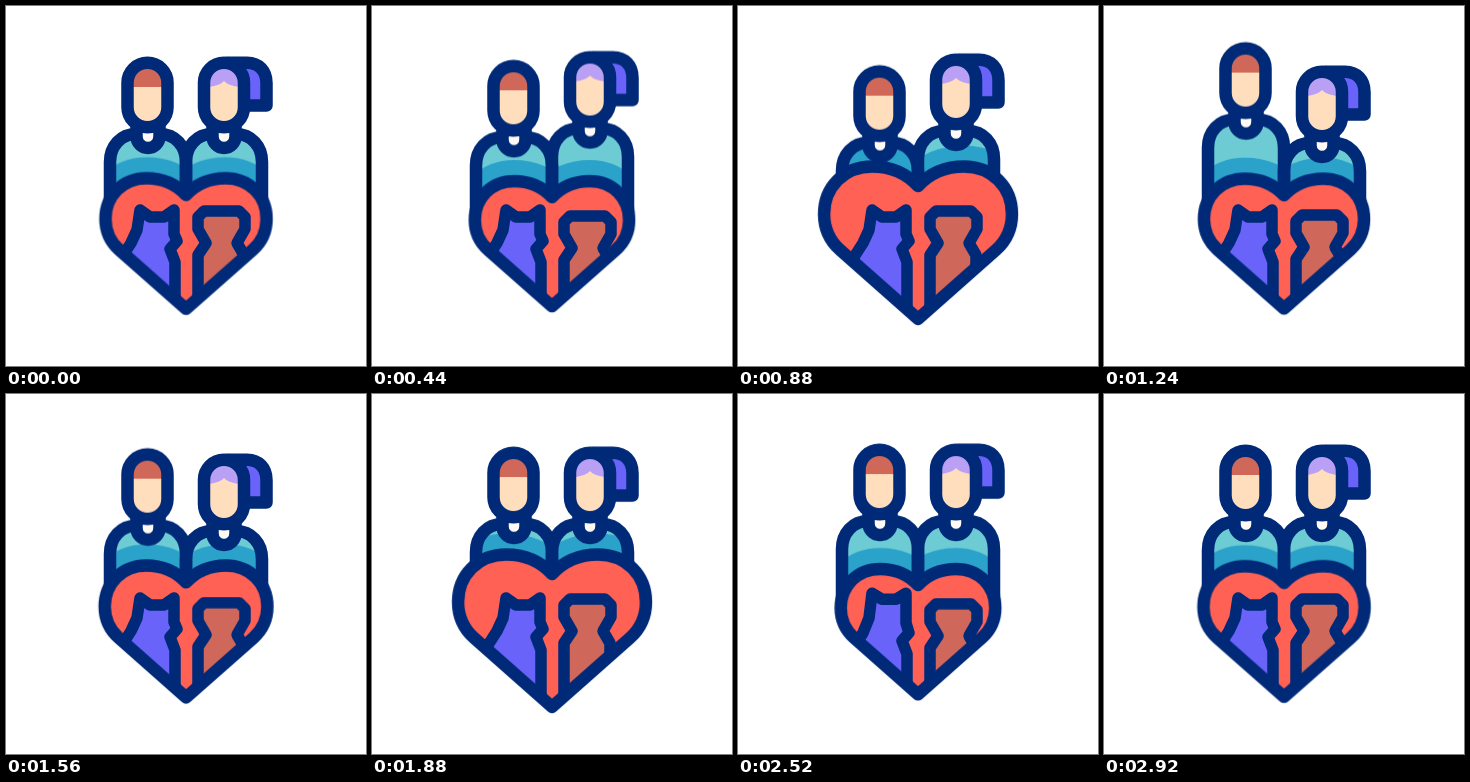
Recreate the animation shown at these times as an HTML page. Size 360 px wide and 360 px high, loop 3 s.

```html
<!DOCTYPE html>
<html lang="en">
<head>
<meta charset="utf-8">
<title>Family heart</title>
<style>
  html, body { margin: 0; width: 100%; height: 100%; overflow: hidden; background: #fff; }
  svg { display: block; width: 100vw; height: 100vh; }
  .line { stroke: #002a78; stroke-width: 12.5; stroke-linejoin: round; stroke-linecap: round; }
  .thin { stroke-width: 11.5; }
  .hollow { fill: none; }
  .man, .woman, .heart, .cat, .dog {
    animation: 3s cubic-bezier(.37, 0, .63, 1) infinite;
  }
  .man { animation-name: man; }
  .woman { animation-name: woman; }
  .dog { animation-name: duck; }
  .cat { animation-name: stretch; }
  .heart { animation-name: beat; transform-origin: 180px 242px; }
  .shade { fill: #2ba2ca; stroke: #2ba2ca; stroke-width: 42; }

  @keyframes man {
    0%, 6.667% { transform: translateY(0); }
    27.333% { transform: translateY(10px); }
    40.667% { transform: translateY(-14.5px); }
    57.333% { transform: translateY(9px); }
    70.667% { transform: translateY(-11px); }
    83% { transform: translateY(-1px); }
    95%, 100% { transform: translateY(0); }
  }
  @keyframes woman {
    0% { transform: translateY(0); }
    7.333% { transform: translateY(5px); }
    21.667% { transform: translateY(-15px); }
    37.333% { transform: translateY(9.5px); }
    41.333%, 57.333% { transform: translateY(9px); }
    70.667% { transform: translateY(-11px); }
    83% { transform: translateY(-1px); }
    95%, 100% { transform: translateY(0); }
  }
  @keyframes beat {
    0% { transform: scale(.857); }
    13.333% { transform: scale(.817); }
    28.667% { transform: scale(1); }
    46.667% { transform: scale(.815); }
    62% { transform: scale(1); }
    80% { transform: scale(.817); }
    97.333%, 100% { transform: scale(.857); }
  }
  @keyframes duck {
    0%, 28.667%, 62%, 97.333%, 100% { transform: translateY(0); }
    14%, 46.667%, 82% { transform: translateY(5px); }
  }
  @keyframes stretch {
    0%, 62%, 97.333%, 100% {
      d: path("M100 276L125 237L131 224L134 204L144 211H158L168 204V228L171 235L164 243L169 256V320H100Z");
    }
    82% {
      d: path("M100 276L125 239L131 224L134 199L144 205H158L168 199V229L171 239L164 247L169 260V320H100Z");
    }
  }
</style>
</head>
<body>
<svg viewBox="0 0 360 360">
  <defs>
    <path id="heartShape" vector-effect="non-scaling-stroke" d="M180 180C168 167 152 160.500 134 160.500C106 160.500 86 181 86 208C86 222 92 235 102 244L180 313L258 244C268 235 274 222 274 208C274 181 254 160.500 226 160.500C208 160.500 192 167 180 180Z"/>
    <path id="torso" d="M-38 212V156C-38 140 -27 128 -12 128H12C27 128 38 140 38 156V212"/>
    <path id="collar" d="M-11.500 120V130.500A11.500 11.500 0 0 0 11.500 130.500V120"/>
    <rect id="face" x="-20" y="56.700" width="40" height="64.600" rx="20"/>
    <clipPath id="faceClip"><use href="#face"/></clipPath>
    <clipPath id="manClip">
      <path class="man" d="M104 212V156C104 140 115 128 130 128H154C169 128 180 140 180 156V212Z"/>
    </clipPath>
    <clipPath id="womanClip">
      <path class="woman" d="M180 212V156C180 140 191 128 206 128H230C245 128 256 140 256 156V212Z"/>
    </clipPath>
    <clipPath id="heartClip"><use href="#heartShape" class="heart"/></clipPath>
  </defs>

  <!-- Torsos with the shade cast by the heart -->
  <g class="man"><use href="#torso" x="142" fill="#6dccd3"/></g>
  <g clip-path="url(#manClip)"><use href="#heartShape" class="heart shade"/></g>
  <g class="woman"><use href="#torso" x="218" fill="#6dccd3"/></g>
  <g clip-path="url(#womanClip)"><use href="#heartShape" class="heart shade"/></g>

  <g class="man">
    <use href="#torso" x="142" class="line hollow"/>
    <use href="#collar" x="142" class="line" fill="#fffaf6"/>
  </g>
  <g class="woman">
    <use href="#torso" x="218" class="line hollow"/>
    <use href="#collar" x="218" class="line" fill="#fffaf6"/>
  </g>

  <!-- Heads -->
  <g class="man">
    <g transform="translate(141.500 0)">
      <g clip-path="url(#faceClip)">
        <rect x="-20" y="56" width="40" height="66" fill="#ffdebe"/>
        <rect x="-20" y="56" width="40" height="25" fill="#d0685a"/>
      </g>
      <use href="#face" class="line hollow"/>
    </g>
  </g>
  <g class="woman">
    <path class="line" fill="#6a63fa" d="M222 56.700H241C253 56.700 260.500 65 260.500 77V99.500H238Z"/>
    <g transform="translate(218 0)">
      <g clip-path="url(#faceClip)">
        <rect x="-20" y="56" width="40" height="66" fill="#ffdebe"/>
        <path fill="#baa0f4" d="M-20 56H20V81C11 81 4 79 0 75C-4 79 -11 81 -20 81Z"/>
      </g>
      <use href="#face" class="line hollow"/>
    </g>
  </g>

  <!-- Heart and pets -->
  <use href="#heartShape" class="heart" fill="#ff6255"/>
  <g clip-path="url(#heartClip)">
    <path class="cat line thin" fill="#6a63fa" d="M100 276L125 237L131 224L134 204L144 211H158L168 204V228L171 235L164 243L169 256V320H100Z"/>
    <path class="dog line thin" fill="#cf685a" d="M192 320V249L200 237L192 223V211L198 205H233L239 211V223L231 237L238 249V320Z"/>
  </g>
  <use href="#heartShape" class="heart line hollow"/>
</svg>
</body>
</html>
```
